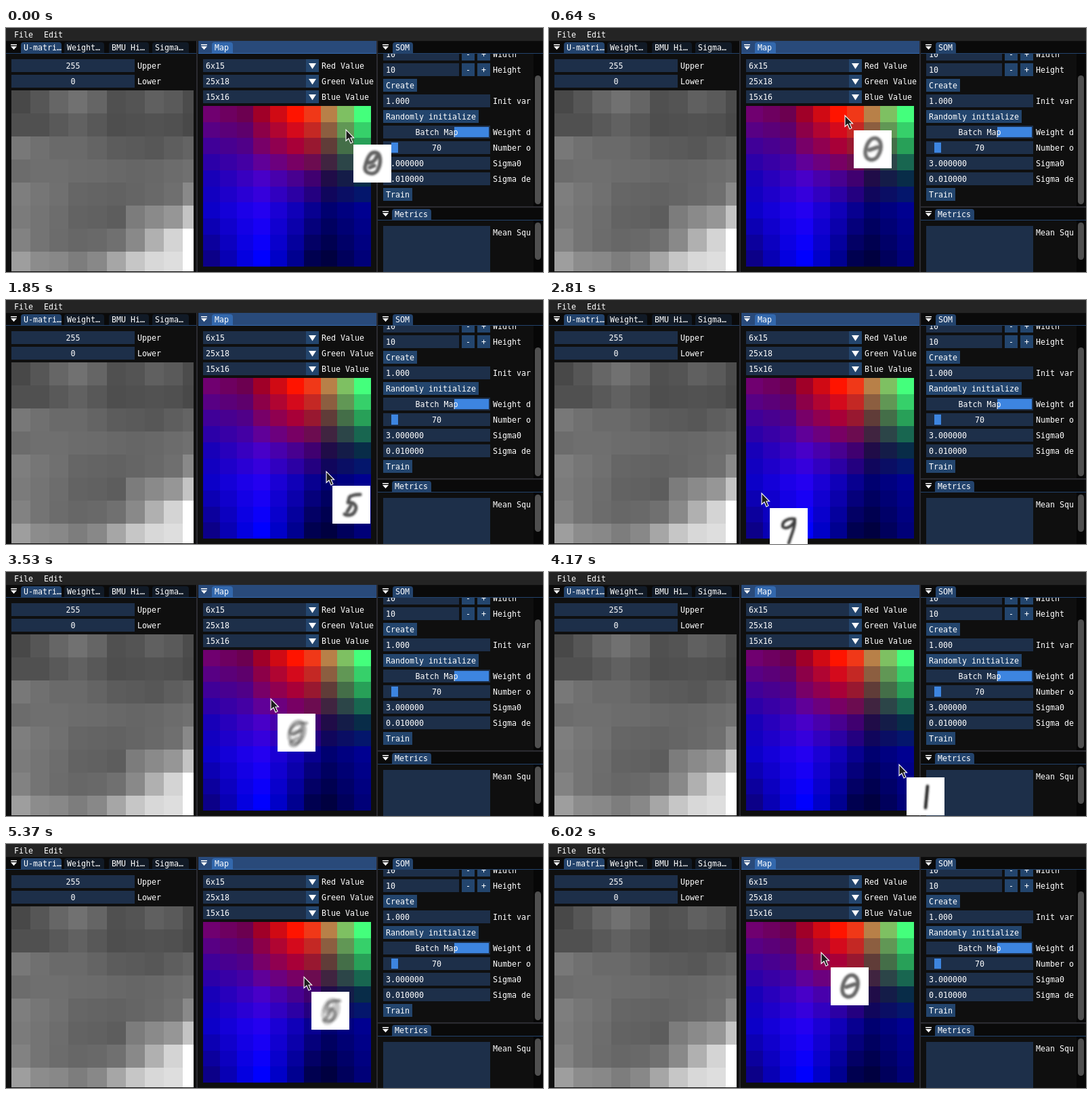
An HTML page that plays this animation: 793x360 px, repeating every 6100 ms.

```html
<!DOCTYPE html>
<html lang="en">
<head>
<meta charset="utf-8">
<title>SOM viewer</title>
<style>
  html, body { margin: 0; width: 100%; height: 100%; overflow: hidden; background: #0f0f0f; }
  svg { display: block; }
  text { font: 11.63px "DejaVu Sans Mono", monospace; fill: #fff; white-space: pre; }
  .mid { text-anchor: middle; }
  .frame { fill: #1d2f49; }
  .button { fill: #23456d; }
  .grab { fill: #3d85e0; }
  .bar { fill: #4f4f4f; }
  .title { fill: #0a0a0a; }
  .tab { fill: #111a26; }
  .open { fill: #23436c; }
  .line { fill: #2b2b31; }
  .ink path { fill: none; stroke: #222; stroke-linecap: round; stroke-linejoin: round; }
</style>
</head>
<body>
<svg id="stage" width="793" height="360" viewBox="0 0 793 360">
  <defs>
    <clipPath id="somClip"><rect x="549" y="38" width="226" height="225"/></clipPath>
    <filter id="soft" x="-30%" y="-30%" width="160%" height="160%"><feGaussianBlur stdDeviation="1.6"/></filter>
  </defs>
  <g id="ui"></g>
  <g id="umatrix" shape-rendering="crispEdges"></g>
  <g id="map" shape-rendering="crispEdges"></g>
  <g id="tip">
    <rect width="56" height="56" fill="#fff"/>
    <g id="digits" class="ink" filter="url(#soft)"></g>
  </g>
  <path id="cursor" d="M0 0V16.5L4 13L7 20L10 18.6L7 12H11.6Z" fill="#1c1c1c" stroke="#fff" stroke-width="1.1"/>
</svg>
<script>
const $ = id => document.getElementById(id);
const rect = (cls, x, y, w, h, r = 0) =>
  `<rect class="${cls}" x="${x}" y="${y}" width="${w}" height="${h}" rx="${r}"/>`;
const fill = (color, x, y, w, h) =>
  `<rect fill="${color}" x="${x}" y="${y}" width="${w}" height="${h}"/>`;
const text = (s, x, y, cls = '') => `<text class="${cls}" x="${x}" y="${y}">${s}</text>`;

// Widgets: y is the top of a 19px row
const label = (s, x, y) => text(s, x, y + 14);
const input = (s, x, y, w) => rect('frame', x, y, w, 19) + label(s, x + 4, y);
const centred = (s, x, y, w) => text(s, x + w / 2, y + 14, 'mid');
const button = (s, x, y, w) => rect('button', x, y, w, 19) + centred(s, x, y, w);
const slider = (s, y, gx, gw) =>
  rect('frame', 557, y, 158, 19) + rect('grab', gx, y + 2, gw, 15) + centred(s, 557, y, 158);
const combo = (s, name, y) => input(s, 291, y, 171) + rect('button', 443, y, 19, 19) +
  `<path fill="#fff" d="M447 ${y + 6}h11l-5.5 8.5z"/>` + label(name, 466, y);
const fold = (x, y) => `<path fill="#fff" d="M${x} ${y}h9v1.5h-9zM${x} ${y + 3}h9l-4.5 5z"/>`;
const tab = (cls, s, x, y, w) =>
  `<path class="${cls}" d="M${x} ${y + 17}v-13q0-4 4-4h${w - 8}q4 0 4 4v13z"/>` + text(s, x + 4, y + 12);

function drawUi() {
  const bars = fill('#242424', 0, 0, 793, 19) + text('File', 12, 14) + text('Edit', 56, 14) +
    rect('title', 0, 20, 281, 18) + rect('title', 550, 20, 243, 18) + rect('title', 550, 266, 243, 18) +
    fill('#294a7a', 284, 19, 263, 19) +
    rect('line', 281, 19, 2, 341) + rect('line', 547, 19, 2, 341) + rect('line', 549, 263, 244, 2);

  const tabs = tab('open', 'U-matri…', 22, 21, 60) + tab('tab', 'Weight…', 86, 21, 59) +
    tab('tab', 'BMU Hi…', 152, 21, 59) + tab('tab', 'Sigma…', 216, 21, 54) +
    `<g style="--c:0"><path fill="#3368ad" d="M304 38v-13q0-4 4-4h23q4 0 4 4v13z"/>${text('Map', 308, 33)}</g>` +
    tab('open', 'SOM', 571, 21, 30) + tab('open', 'Metrics', 570, 267, 58) +
    rect('open', 0, 37, 281, 1) + rect('open', 549, 37, 244, 1) + rect('open', 549, 283, 244, 1) +
    fill('#3368ad', 284, 37, 263, 1) +
    [[7, 24], [288, 24], [556, 24], [556, 270]].map(p => fold(...p)).join('');

  const left = rect('frame', 8, 46, 182, 19) + centred('255', 8, 46, 182) + label('Upper', 194, 46) +
    rect('frame', 8, 69, 182, 19) + centred('0', 8, 69, 182) + label('Lower', 194, 69);

  const middle = combo('6x15', 'Red Value', 46) + combo('25x18', 'Green Value', 69) +
    combo('15x16', 'Blue Value', 92);

  const size = (name, y) => input('10', 557, y, 112) + button('-', 673, y, 19) +
    button('+', 696, y, 19) + label(name, 719, y);
  const right = '<g clip-path="url(#somClip)">' + size('Width', 29) + size('Height', 52) +
    button('Create', 557, 75, 50) +
    input('1.000', 557, 98, 158) + label('Init var', 719, 98) +
    button('Randomly initialize', 557, 121, 141) +
    slider('Batch Map', 144, 662, 51) + label('Weight d', 719, 144) +
    slider('70', 167, 569, 10) + label('Number o', 719, 167) +
    input('3.000000', 557, 190, 158) + label('Sigma0', 719, 190) +
    input('0.010000', 557, 213, 158) + label('Sigma de', 719, 213) +
    button('Train', 557, 236, 43) + '</g>';

  const metrics = rect('frame', 557, 292, 158, 68) + label('Mean Squ', 719, 292);
  const scroll = fill('#070707', 779, 38, 14, 225) + fill('#070707', 779, 284, 14, 76) +
    rect('bar', 781, 70, 9, 190, 4.5) + rect('bar', 781, 287, 9, 55, 4.5);
  $('ui').innerHTML = bars + tabs + left + middle + right + metrics + scroll;
}

const GREY = [
  [72, 86, 102, 113, 101, 80, 84, 96, 90, 76],
  [80, 80, 89, 97, 88, 78, 80, 82, 80, 73],
  [120, 112, 106, 106, 100, 92, 90, 87, 94, 100],
  [108, 111, 111, 108, 107, 104, 102, 104, 108, 112],
  [126, 118, 112, 102, 100, 98, 101, 105, 111, 137],
  [123, 116, 109, 99, 97, 93, 124, 138, 150, 196],
  [130, 116, 108, 103, 105, 112, 137, 176, 212, 255],
  [158, 140, 136, 125, 136, 166, 198, 216, 222, 255]
];

function drawUmatrix() {
  const edge = c => Math.min(277, Math.round(8 + 28.1 * c));
  $('umatrix').innerHTML = GREY.map((row, r) => row.map((v, c) =>
    fill(`rgb(${v},${v},${v})`, edge(c), 92 + 34 * r, edge(c + 1) - edge(c), Math.min(34, 267 - 34 * r))
  ).join('')).join('');
}

// Map colours are blended between a few known cells
const COLS = [0, 2, 3, 5, 6, 7, 9], ROWS = [0, 2, 4, 6, 9];
const INKS = [
  '#700070 #6c0050 #a00028 #ff1400 #f03818 #b88048 #44ff7c',
  '#400098 #500088 #780068 #a80038 #981830 #603c38 #28a058',
  '#1800b8 #3800c0 #4800c8 #480090 #400070 #200c48 #082c48',
  '#0c00c8 #1c00e8 #2400f0 #1000b8 #080090 #000070 #000090',
  '#0c0088 #0400e0 #0000ff #000090 #000050 #000040 #000078'
].map(row => row.split(' ').map(h => [1, 3, 5].map(i => parseInt(h.slice(i, i + 2), 16))));
const mix = (a, b, k) => a.map((v, i) => v + (b[i] - v) * k);

function locate(stops, v) {
  let i = 0;
  while (i < stops.length - 2 && v >= stops[i + 1]) i++;
  return [i, (v - stops[i]) / (stops[i + 1] - stops[i])];
}

function drawMap() {
  const ex = c => Math.round(291 + 24.8 * c), ey = r => Math.round(115 + 23.7 * r);
  let out = '';
  for (let r = 0; r < 10; r++) for (let c = 0; c < 10; c++) {
    const [i, u] = locate(COLS, c), [j, v] = locate(ROWS, r);
    const row = k => mix(INKS[k][i], INKS[k][i + 1], u);
    const rgb = mix(row(j), row(j + 1), v).map(Math.round);
    out += fill(`rgb(${rgb})`, ex(c), ey(r), ex(c + 1) - ex(c), ey(r + 1) - ey(r));
  }
  $('map').innerHTML = out;
}

// Blurred digits: column, row, stroke width, opacity, path
const DIGITS = [
  [8, 1, 5.5, .72, 'M34 12C23 9 19 25 17 34C17 45 33 45 36 37C41 28 41 14 34 12M22 27C28 27 33 23 34 18M24 34L31 31'],
  [1, 0, 5.5, .68, 'M35 17C28 9 17 14 19 22C21 29 32 27 35 19C37 27 38 36 34 43C29 48 23 46 21 42M24 29L35 31'],
  [7, 5, 5, .78, 'M41 13C34 13 28 14 25 17L23 25C31 24 37 29 34 36C31 44 23 45 18 42M27 30L22 38'],
  [0, 7, 4.2, .9, 'M37 16C27 14 18 20 19 27C21 32 33 29 37 18C38 28 31 41 28 52'],
  [9, 7, 4.6, 1, 'M31 13L28 45'],
  [4, 5, 4.6, .78, 'M43 14C32 13 19 18 18 27C19 34 30 31 36 19C36 29 34 40 28 46C24 49 18 47 19 43C21 38 29 37 35 34'],
  [4, 1, 5.6, .7, 'M34 12C24 9 18 22 17 32C17 45 29 46 35 39C42 29 42 16 34 12M23 29L35 25']
];

function drawDigits() {
  $('digits').innerHTML = DIGITS.map(([, , w, , d]) => `<path stroke-width="${w}" d="${d}"/>`).join('');
}

function blendDigits(x, y) {
  const cell = v => Math.max(0, Math.min(9, Math.floor(v)));
  const c = cell((x - 291) / 24.8), r = cell((y - 115) / 23.7);
  const pull = DIGITS.map(([dc, dr]) => 1 / (((c - dc) ** 2 + (r - dr) ** 2) ** 2 + 1e-4));
  const sum = pull.reduce((a, b) => a + b);
  DIGITS.forEach((d, i) => {
    $('digits').children[i].style.opacity = d[3] * pull[i] / sum;
  });
}

// Pointer path: time, x, y, tooltip offset
const PATH = [
  [0, 502, 150, 11, 22], [80, 502, 150, 11, 22], [320, 511, 134, 11, 22], [400, 511, 134, 11, 22],
  [720, 412, 127, 13, 22], [1040, 318, 121, 11, 21], [1290, 318, 120, 11, 21],
  [1570, 392, 178, 9, 21], [1850, 473, 253, 9, 21], [2090, 509, 292, 11, 22],
  [2490, 407, 300, 21, 22], [2810, 314, 285, 12, 22], [3130, 308, 226, 11, 23],
  [3450, 366, 192, 10, 22], [3770, 464, 171, 8, 21], [4170, 517, 284, 11, 19],
  [4410, 500, 269, 11, 23], [4890, 393, 257, 12, 24], [5050, 398, 220, 11, 23],
  [5610, 471, 178, 11, 22], [5940, 436, 168, 14, 22], [6020, 402, 160, 14, 22]
];
const TIMES = PATH.map(p => p[0]);
const LOOP = 6100, STEP = 80;

// The pointer is sampled every 80 ms, with two rests
function sample(t) {
  const tick = (from, last) => Math.min(last, from + Math.floor((t - from) / STEP) * STEP);
  if (t < 1290) return tick(0, 1040);
  return t < 5940 ? tick(1290, 5610) : tick(5940, 6020);
}

function draw() {
  const [i, k] = locate(TIMES, sample(performance.now() % LOOP));
  const [, x, y, dx, dy] = mix(PATH[i], PATH[i + 1], k).map(Math.round);
  $('cursor').setAttribute('transform', `translate(${x} ${y})`);
  $('tip').setAttribute('transform', `translate(${x + dx} ${y + dy})`);
  blendDigits(x, y);
  requestAnimationFrame(draw);
}

drawUi();
drawUmatrix();
drawMap();
drawDigits();
draw();
</script>
</body>
</html>
```
